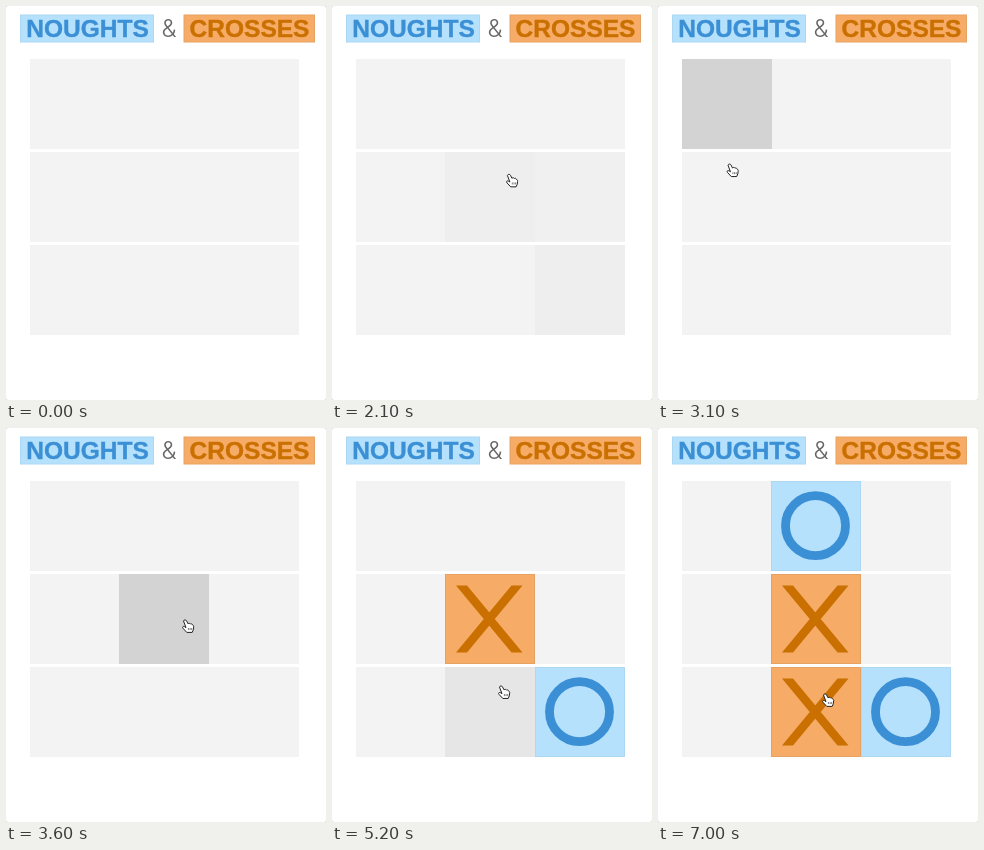
Animation, 320 px wide and 394 px high, one loop 8000 ms. Source, as an HTML page:

```html
<!DOCTYPE html>
<html lang="en">
<meta charset="utf-8">
<title>Noughts & Crosses</title>
<style>
  html, body { margin: 0; width: 100%; height: 100%; overflow: hidden; background: #ccc; }
  svg { display: block; width: 320px; height: 394px; }
  text { font: 24.5px "Liberation Sans", Arial, sans-serif; text-anchor: middle; }
  .bold { font-weight: bold; stroke-width: .4; }
  .amp { font: 300 24px Inter, sans-serif; }
  rect.blue { fill: #b5e1fc; stroke: #acd8f3; }
  rect.orange { fill: #f6ab66; stroke: #e6a263; }
  .blueInk { fill: #3b8fd5; stroke: #3b8fd5; }
  .orangeInk { fill: #c97000; stroke: #c97000; }
</style>
<svg viewBox="0 0 320 394">
  <defs>
    <g id="nought">
      <rect class="blue" x="-44.5" y="-44.5" width="89" height="89"/>
      <circle class="blueInk" cx="-.5" cy="-.3" r="30" style="fill: none" stroke-width="8.8"/>
    </g>
    <g id="cross">
      <rect class="orange" x="-44.5" y="-44.5" width="89" height="89"/>
      <path class="orangeInk" stroke="none" stroke-width="0"
        d="M-34-33.5h11L32.5 33.5h-11ZM21.5-33.5h11L-23 33.5h-11Z"/>
    </g>
  </defs>
  <rect width="320" height="394" rx="2" fill="#fff"/>
  <rect class="blue" x="14.5" y="9" width="133" height="27"/>
  <text class="bold blueInk" x="81.5" y="31">NOUGHTS</text>
  <text class="amp" x="163" y="31" fill="#666">&amp;</text>
  <rect class="orange" x="178" y="9" width="130.5" height="27"/>
  <text class="bold orangeInk" x="243.5" y="31">CROSSES</text>
  <g id="board"></g>
  <g id="cursor">
    <path id="arrow" d="M0 0V11L2.5 8.7 4.2 12.4 6 11.6 4.4 8H7.5Z" stroke="#fff" stroke-width=".6"/>
    <g id="hand" fill="#fff" stroke="#222" stroke-linejoin="round">
      <path d="M1.5 2C2 .6 3.8.5 4.5 1.8L6 4.8C7 4 8 4.2 8.5 5 9.3 4.5 10.2 5 10.6 6 11.5 6.2 11.8 7 11.7 8L11.3 10.8 10.2 13.4H4.8L1 9.3C0 8 1.3 7 2.4 7.6L4 8.6Z"/>
      <path d="M6.4 9v2M8.1 9v2M9.7 9v2" stroke-width=".6"/>
    </g>
  </g>
</svg>
<script>
const LOOP = 8000, FADE = 300, LAG = 60, STEP = 10;
const $ = id => document.getElementById(id);
const clamp = v => Math.max(0, Math.min(1, v));
const easeOut = k => 1 - (1 - k) ** 1.76;

// Each click places a cross and is answered by a nought.
const clicks = [
  { time: 3860, cross: 4, nought: 8 },
  { time: 6160, cross: 7, nought: 1 }
];

// Cursor stops: time, x, y
const path = [
  [500, 297, 384], [600, 295, 339], [1700, 295, 339], [2400, 139, 118],
  [3000, 70, 125], [3100, 68, 157], [3500, 176, 191], [4800, 176, 191],
  [5200, 166, 257], [5500, 164, 265]
];

const left = i => 24 + Math.floor(i % 3 * 269 / 3);
const top_ = i => 53 + Math.floor(i / 3) * 93;

function add(tag, attrs) {
  const el = document.createElementNS('http://www.w3.org/2000/svg', tag);
  for (const key in attrs) el.setAttribute(key, attrs[key]);
  return $('board').appendChild(el);
}

for (let row = 0; row < 3; row++)
  add('rect', { x: 24, y: top_(row * 3), width: 269, height: 90, fill: '#f3f3f3' });

const shades = Array.from({ length: 9 }, (_, i) =>
  add('rect', { x: left(i), y: top_(i), width: 90, height: 90, fill: '#d3d3d3' }));

const marks = clicks.flatMap(click => ['cross', 'nought'].map(symbol => ({
  time: click.time,
  el: add('use', { href: '#' + symbol, x: left(click[symbol]) + 45, y: top_(click[symbol]) + 45 })
})));

function cursorAt(t) {
  const next = path.findIndex(p => p[0] > t);
  if (next < 1) return path.at(next).slice(1);
  const [t0, x0, y0] = path[next - 1], [t1, x1, y1] = path[next];
  const k = easeOut((t - t0) / (t1 - t0));
  return [x0 + (x1 - x0) * k, y0 + (y1 - y0) * k];
}

// The fingertip sits 3px right of the cursor's corner.
function cellUnder([x, y]) {
  const col = Math.floor((x + 3 - 24) / 89.67), row = Math.floor((y - 53) / 93);
  const inside = col >= 0 && col < 3 && row >= 0 && row < 3 && (y - 53) % 93 < 90;
  return inside ? row * 3 + col : -1;
}

const hovered = Array.from({ length: LOOP / STEP }, (_, i) => cellUnder(cursorAt(i * STEP - LAG)));

function hoverLevels(t) {
  const levels = Array(9).fill(0);
  for (let i = 0; i * STEP < t; i++)
    levels.forEach((level, cell) => {
      const change = Math.min(STEP, t - i * STEP) / FADE;
      levels[cell] = clamp(level + (hovered[i] === cell ? change : -change));
    });
  return levels;
}

function draw() {
  const t = performance.now() % LOOP;
  hoverLevels(t).forEach((level, i) => shades[i].setAttribute('opacity', level));
  marks.forEach(({ time, el }) => el.setAttribute('opacity', clamp((t - time) / FADE)));

  const [x, y] = cursorAt(t);
  const overBoard = x < 290 && y < 329;
  $('cursor').setAttribute('transform', `translate(${x} ${y})`);
  $('cursor').setAttribute('opacity', t < path[0][0] ? 0 : 1);
  $('arrow').setAttribute('opacity', overBoard ? 0 : 1);
  $('hand').setAttribute('opacity', overBoard ? 1 : 0);
  requestAnimationFrame(draw);
}
draw();
</script>
</html>
```
